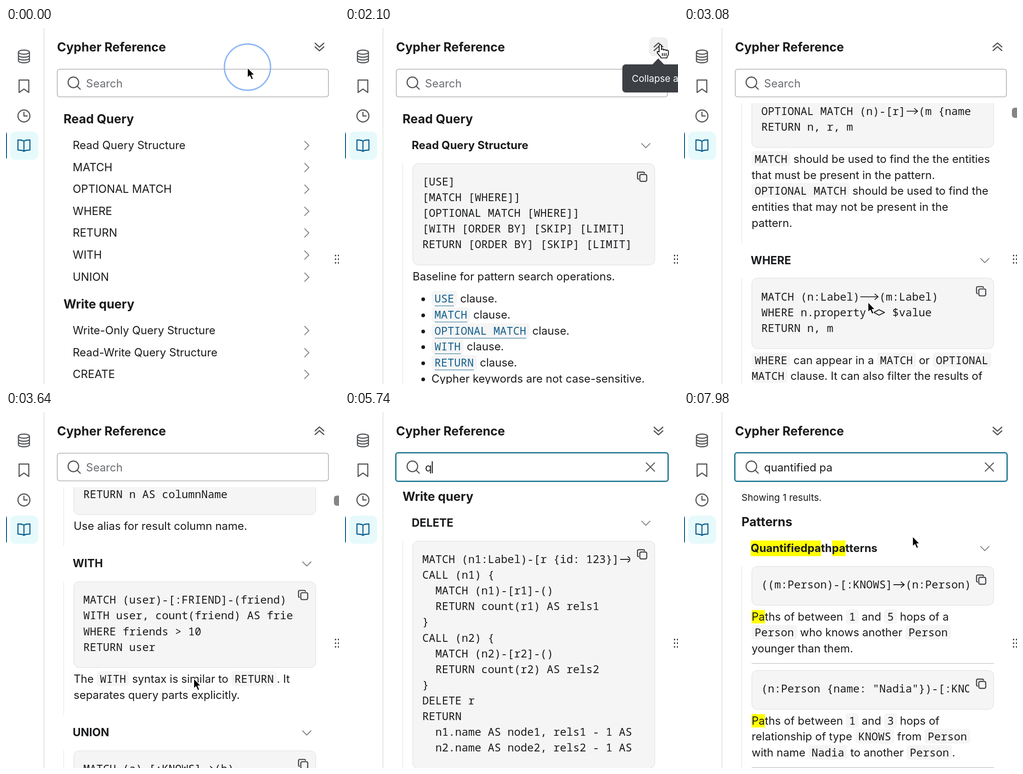
Recreate the animation shown at these times as an HTML page. Size 724x773 px, loop 8000 ms.

```html
<!DOCTYPE html>
<html lang="en">
<head>
<meta charset="utf-8">
<title>Cypher Reference</title>
<style>
  html, body { margin: 0; width: 100%; height: 100%; overflow: hidden; background: #fff; }
  body { position: relative; font: 24px Inter, sans-serif; color: #1a1b1d; }
  #view { position: absolute; left: 0; top: 163px; width: 724px; height: 610px; overflow: hidden; }
  .page { position: absolute; left: 0; top: -163px; }
  .page > * { position: absolute; }
  .line { white-space: pre; line-height: 40px; margin-top: -20px; }
  .head { font-size: 26.8px; font-weight: 700; }
  .open { display: flex; white-space: nowrap; font-weight: 700; line-height: 34px; margin-top: -17px; }
  .note { font-size: 20.5px; }
  .box { left: 147px; width: 525px; border: 1px solid #dcdcdd; border-radius: 12px; background: #f5f5f5; }
  .box div { position: absolute; left: 20px; width: 458px; overflow: hidden; white-space: pre; line-height: 34px; }
  .box div:first-child { width: 452px; }
  .box, code { font-family: "Noto Sans Mono", "DejaVu Sans Mono", monospace; font-size: 23.75px; }
  .box > svg { position: absolute; left: 486px; top: 16px; }
  .lig { vertical-align: 1px; }
  code { line-height: 0; padding: 0 6.5px; border-radius: 6px; background: #f5f5f5; }
  code.cut { padding-left: 0; }
  code u { text-decoration: none; color: #14608c; border-bottom: 1.5px solid #14608c; }
  mark { background: #ff0; color: inherit; }
  .rule { left: 147px; width: 527px; height: 1.5px; background: #d8d8d9; }
  .rail { left: 124.5px; width: 1.5px; background: #e2e2e3; }
  .dot { left: 166px; width: 8px; height: 8px; margin-top: -4px; border-radius: 50%; background: #1a1b1d; }
  svg { display: inline-block; fill: none; stroke-linecap: round; stroke-linejoin: round; }
  #ui { position: absolute; left: 0; top: 0; }
  #ui text { fill: #1a1b1d; }
</style>
</head>
<body>
<div id="view"></div>
<svg id="ui" width="724" height="773" viewBox="0 0 724 773">
  <path d="M82.5 0V773" stroke="#dededf" stroke-width="1.5"/>
  <rect x="9" y="225" width="61" height="61" rx="12" fill="#e7fafb"/>
  <path d="M0 226h0q2 2 2 6v47q0 4-2 6z" fill="#0a6190"/>
  <g stroke="#535558" stroke-width="2.4">
    <ellipse cx="39" cy="52.500" rx="12" ry="4.500"/>
    <path d="M27 52.500V71c0 6 24 6 24 0V52.500M27 59c0 6 24 6 24 0M27 65c0 6 24 6 24 0"/>
    <path d="M28.500 113h21v27L39 132.500 28.500 140z"/>
    <circle cx="39" cy="191" r="13"/><path d="M39 183v8h7"/>
    <path d="M39 246c-3-3-7-3-13-3v22c6 0 10 0 13 3 3-3 7-3 13-3v-22c-6 0-10 0-13 3zv22" stroke="#0a6190"/>
  </g>
  <text x="111" y="50.500" font-size="26.8" font-weight="700">Cypher Reference</text>
  <rect id="field" fill="#fff"/>
  <g stroke="#535558" stroke-width="2.400"><circle cx="146.500" cy="118" r="11.500"/><path d="M155 126.500l6.500 6.500"/></g>
  <text id="typed" x="174" y="128.700" style="white-space:pre"></text>
  <path id="caret" stroke="#111" stroke-width="2" stroke-linecap="butt"/>
  <path id="clear" d="M655 110.500l18 18m0-18l-18 18" stroke="#535558" stroke-width="2.200"/>
  <rect id="hover" x="661" y="20" width="41" height="41" rx="10" fill="#efeff0"/>
  <path id="toggle" stroke="#535558" stroke-width="2.400"/>
  <g fill="#3a3a3c">
    <circle cx="716.500" cy="494" r="1.700"/><circle cx="716.500" cy="502" r="1.700"/><circle cx="716.500" cy="510" r="1.700"/>
    <circle cx="723" cy="494" r="1.700"/><circle cx="723" cy="502" r="1.700"/><circle cx="723" cy="510" r="1.700"/>
  </g>
  <rect id="thumb" x="713" width="20" height="22" rx="6" fill="#858587"/>
  <g id="tip">
    <path d="M668 79.500l13-13.500 13 13.500z" fill="#3c3f44"/>
    <rect id="tipBox" y="79" width="160" height="61" rx="7" fill="#3c3f44"/>
    <text id="tipText" y="117" font-size="20.500" style="fill:#fff"></text>
  </g>
  <circle id="ring" stroke="#8ab4f5" stroke-width="3"/>
  <g id="mouse">
    <path id="arrow" d="M0 0V22L5 17.500 8.700 26 12.500 24.300 9 16H15.500Z" fill="#000" stroke="#fff" stroke-width="1.500"/>
    <g id="hand" stroke="#000" stroke-width="1.700"><path d="M-2 2c0-4 5-4 5 0v8c1-2 5-2 5 1 1-2 5-1 5 1 1-2 5-1 5 2v6c0 3-3 4-3 8H2c0-3-5-6-8-11-1-3 2-4 4-2z" fill="#fff"/><path d="M5 18v5m4-5v5m4-5v5"/></g>
    <path id="beam" d="M-4-12q4 0 4 3V9q0 3-4 3M4-12q-4 0-4 3V9q0 3 4 3" stroke="#222" stroke-width="1.700"/>
  </g>
</svg>
<script>
const $ = id => document.getElementById(id);
const LOOP = 8000;

// Array blocks are code samples, strings are prose; "* " starts a bullet.
const guide = [
  ['Read Query', [
    ['Read Query Structure',
      ['[USE]', '[MATCH [WHERE]]', '[OPTIONAL MATCH [WHERE]]', '[WITH [ORDER BY] [SKIP] [LIMIT]', 'RETURN [ORDER BY] [SKIP] [LIMIT]'],
      'Baseline for pattern search operations.\n* `USE` clause.\n* `MATCH` clause.\n* `OPTIONAL MATCH` clause.\n* `WITH` clause.\n* `RETURN` clause.\n* Cypher keywords are not case-sensitive.\n* Cypher is case-sensitive for variables.'],
    ['MATCH',
      ['MATCH (n:Label)-[r]->(m:Label)', 'WHERE n.property = $value', 'RETURN n, r, m'],
      '`MATCH` is used to search for the patterns\ndescribed in the clause. It is the primary way\nof getting data from the graph.'],
    ['OPTIONAL MATCH',
      ['MATCH (n:Label)', 'OPTIONAL MATCH (n)-[r]->(m {name: $value})', 'RETURN n, r, m'],
      '`MATCH` should be used to find the the entities\nthat must be present in the pattern.\n`OPTIONAL MATCH` should be used to find the\nentities that may not be present in the\npattern.'],
    ['WHERE',
      ['MATCH (n:Label)-->(m:Label)', 'WHERE n.property <> $value', 'RETURN n, m'],
      '`WHERE` can appear in a `MATCH` or `OPTIONAL`\n`~MATCH` clause. It can also filter the results of\na `WITH` clause.'],
    ['RETURN',
      ['MATCH (n:Label)', 'RETURN *'],
      'Return the value of all variables.',
      ['MATCH (n:Label)', 'RETURN n AS columnName'],
      'Use alias for result column name.'],
    ['WITH',
      ['MATCH (user)-[:FRIEND]-(friend)', 'WITH user, count(friend) AS friends', 'WHERE friends > 10', 'RETURN user'],
      'The `WITH` syntax is similar to `RETURN`. It\nseparates query parts explicitly.'],
    ['UNION',
      ['MATCH (a)-[:KNOWS]->(b)', 'RETURN b.name AS name', 'UNION', 'MATCH (a)-[:LOVES]->(b)', 'RETURN b.name AS name'],
      'Return the distinct union of all query results.'],
  ]],
  ['Write query', ['Write-Only Query Structure', 'Read-Write Query Structure', 'CREATE', 'SET', 'MERGE', 'DELETE', 'REMOVE'].map(plain)],
  ['Patterns', ['Node patterns', 'Relationship patterns', 'Path patterns', 'Quantified path patterns'].map(plain)],
];
function plain(name) {
  return [name, ['MATCH (n:Label)', 'SET n.property = $value', 'RETURN n'], 'Baseline for ' + name + '.'];
}

const rels = i => [`CALL (n${i}) {`, `  MATCH (n${i})-[r${i}]-()`, `  RETURN count(r${i}) AS rels${i}`, '}'];
const deletion = [['Write query', [['DELETE', [
  'MATCH (n1:Label)-[r {id: 123}]->(n2:Label)', ...rels(1), ...rels(2), 'DELETE r', 'RETURN',
  '  n1.name AS node1, rels1 - 1 AS', '  n2.name AS node2, rels2 - 1 AS'],
  'Delete a relationship.']]]];
const quantified = [['Patterns', [['Quantified path patterns',
  ['((m:Person)-[:KNOWS]->(n:Person) WHERE'],
  'Paths of between `1` and `5` hops of a\n`Person` who knows another `Person`\nyounger than them.',
  ['(n:Person {name: "Nadia"})-[:KNOWS]-{1,3}'],
  'Paths of between `1` and `3` hops of\nrelationship of type `KNOWS` from `Person`\nwith name `Nadia` to another `Person`.',
  ['(n:Person)-[:KNOWS]->+(m:Person)']]]]];

const CELL = 14.25;
const ligs = {
  '-->': 'M2 7H40M33 1l7 6-7 6',
  '->': 'M3 7H26M19 1l7 6-7 6',
  '<>': 'M3 7L14 1 26 7 14 13z',
};
const sample = s => s.replace(/-->|->|<>/g, k =>
  `<svg class="lig" width="${k.length * CELL}" height="14"><path d="${ligs[k]}" stroke="#1a1b1d" stroke-width="1.8"/></svg>`);
const copyIcon = '<svg width="24" height="24" stroke="#45474a" stroke-width="2.4"><rect x="7" y="7" width="15" height="15" rx="3"/><path d="M4 17q-2 0-2-3V5q0-3 3-3h9q3 0 3 2"/></svg>';

function prose(s, mark, link) {
  return s.split('`').map((part, i) => {
    if (i % 2 === 0) return mark(part);
    const cut = part[0] === '~';
    const word = cut ? part.slice(1) : part;
    return `<code${cut ? ' class="cut"' : ''}>${link ? `<u>${word}</u>` : word}</code>`;
  }).join('');
}

function build(sections, { y, open, terms, note }) {
  const out = [], tops = {};
  const put = (cls, top, html = '', style = '') =>
    out.push(`<div class="${cls}" style="top:${top}px;${style}">${html}</div>`);
  const line = (cls, x, cy, html) => put('line ' + cls, cy, html, `left:${x}px`);
  const mark = s => terms ? s.replace(RegExp(terms, 'gi'), '<mark>$&</mark>') : s;
  const chevron = (cy, d) => out.push(
    `<svg width="24" height="24" style="left:642px;top:${cy - 12}px"><path d="${d}" stroke="#8c8d90" stroke-width="2.2"/></svg>`);

  function body(blocks, head) {
    let at = head + 38.5, last = at;
    blocks.forEach((block, n) => {
      if (Array.isArray(block)) {
        if (n) { put('rule', last + 31); at = last + 46.5; }
        const h = 85 + 34.1 * (block.length - 1);
        const rows = block.map((s, i) => `<div style="top:${21.5 + 34.1 * i}px">${sample(s)}</div>`);
        put('box', at, rows.join('') + copyIcon, `height:${h - 2}px`);
        last = at += h;
        return;
      }
      let cy = at + 25, listed = false;
      block.split('\n').forEach((s, i) => {
        const item = s.startsWith('* ');
        if (i) cy += item && !listed ? 48 : 34.8;
        listed = item;
        if (item) put('dot', cy + 1);
        line('', item ? 188 : 147, cy, prose(item ? s.slice(2) : s, mark, item));
      });
      last = cy;
    });
    put('rail', head + 38, '', `height:${last + 5 - head}px`);
    return last + 81;
  }

  if (note) line('note', 125, 186, note);
  for (const [title, items] of sections) {
    line('head', 125, y, title);
    y += 58;
    for (const [name, ...blocks] of items) {
      tops[name] = y;
      line(open ? 'open' : '', 145, y, mark(name));
      chevron(y, open ? 'M3 8l9 9 9-9' : 'M7.500 3l9 9-9 9');
      y = open ? body(blocks, y) : y + 47.6;
    }
    y += open ? 0 : 10.8;
  }
  const el = document.createElement('div');
  el.className = 'page';
  el.innerHTML = out.join('');
  $('view').append(el);
  return { el, tops };
}

const found = terms => build(quantified, { y: 238, open: true, terms, note: 'Showing 1 results.' });
const pages = {
  closed: build(guide, { y: 197 }),
  open: build(guide, { y: 197, open: true }),
  del: build(deletion, { y: 183, open: true }),
  hit: found('q'),
  word: found('quantified'),
  both: found('quantified|pa'),
};

const EXPAND = 1300, COLLAPSE = 4060, FOCUS = 5030;
const clicks = [[-290, 525, 85], [EXPAND, 685, 38], [COLLAPSE, 680, 38], [FOCUS, 493, 105]];
const path = [[250, 525, 86], [870, 685, 37], [2120, 685, 37], [2700, 400, 595], [3600, 400, 595],
  [4000, 679, 36], [4560, 679, 36], [4950, 493, 105], [7700, 493, 105], [7960, 497, 270]];
const query = 'quantified pa';
const keys = [5670, 5790, 5950, 6090, 6210, 6300, 6440, 6720, 6790, 6860, 7070, 7280, 7420];
const seen = pages.open.tops.WHERE - 508;

const clamp = v => Math.max(0, Math.min(1, v));
const smooth = p => p * p * (3 - 2 * p);
const within = (t, a, b) => t >= a && t < b;
const show = (id, on) => { $(id).style.display = on ? '' : 'none'; };
function set(id, attrs) { for (const k in attrs) $(id).setAttribute(k, attrs[k]); }

function pointer(t) {
  let i = path.findIndex(p => p[0] > t);
  if (i === 0) return path[0].slice(1);
  if (i < 0) return path[path.length - 1].slice(1);
  const [t0, x0, y0] = path[i - 1], [t1, x1, y1] = path[i];
  const p = smooth((t - t0) / (t1 - t0));
  return [x0 + (x1 - x0) * p, y0 + (y1 - y0) * p];
}

function scrollAt(t) {
  if (t >= COLLAPSE) return 416;
  const a = clamp((t - 2750) / 330), b = clamp((t - 3080) / 570);
  return seen * Math.pow(a, 1.5) + 1000 * (1 - (1 - b) ** 2);
}

function pageAt(t) {
  if (t >= 7490) return 'both';
  if (t >= 7140) return 'word';
  if (t >= keys[2]) return 'hit';
  if (t >= keys[0]) return 'del';
  return within(t, EXPAND, COLLAPSE) ? 'open' : 'closed';
}

function draw(t) {
  const name = pageAt(t), expanded = name === 'open', scroll = scrollAt(t);
  for (const k in pages) pages[k].el.style.display = k === name ? '' : 'none';
  const listed = expanded || name === 'closed';
  pages[name].el.style.transform = `translateY(${listed ? -scroll : 0}px)`;
  show('thumb', within(t, 2760, COLLAPSE));
  set('thumb', { y: 163 + 10 * scroll / seen });

  const focused = t >= FOCUS;
  set('field', focused
    ? { x: 110.5, y: 88.5, width: 592, height: 62, rx: 5, stroke: '#2d7f98', 'stroke-width': 3 }
    : { x: 111.5, y: 89.5, width: 589.5, height: 60, rx: 5, stroke: '#adaeb1', 'stroke-width': 1.6 });
  const count = keys.filter(k => k <= t).length;
  $('typed').textContent = count ? query.slice(0, count) : 'Search';
  $('typed').style.fill = count ? '#1a1b1d' : '#6a6c70';
  show('clear', count);
  const since = t - (count ? keys[count - 1] : FOCUS);
  show('caret', focused && Math.floor(since / 500) % 2 === 0);
  const end = count ? 174 + $('typed').getComputedTextLength() : 174;
  set('caret', { d: `M${end + 1} 107v26` });

  const [x, y] = pointer(t);
  const over = Math.abs(x - 681.5) < 21 && Math.abs(y - 40.5) < 21;
  show('hover', over);
  set('toggle', { d: expanded ? 'M672 41l9.500-8.500 9.500 8.500M672 49l9.500-8.500 9.500 8.500' : 'M672 33l9.500 8.500 9.500-8.500M672 41l9.500 8.500 9.500-8.500' });
  show('tip', over);
  const left = expanded ? 603 : 609;
  set('tipBox', { x: left });
  set('tipText', { x: left + 20.5 });
  $('tipText').textContent = expanded ? 'Collapse all' : 'Expand all';

  const inField = within(y, 89, 150) && within(x, 111, 701);
  show('mouse', !within(t, keys[0], 7700));
  set('mouse', { transform: `translate(${x} ${y})` });
  show('hand', over);
  show('beam', inField && !over);
  show('arrow', !over && !inField);

  const click = clicks.find(c => within(t, c[0], c[0] + 420));
  show('ring', click);
  if (click) {
    const p = (t - click[0]) / 420;
    set('ring', { cx: click[1], cy: click[2], r: 20 + 43.5 * p, opacity: Math.min(1, (1 - p) * 3.2) });
  }
}

const start = performance.now();
function tick() {
  draw((performance.now() - start) % LOOP);
  requestAnimationFrame(tick);
}
tick();
</script>
</body>
</html>
```
